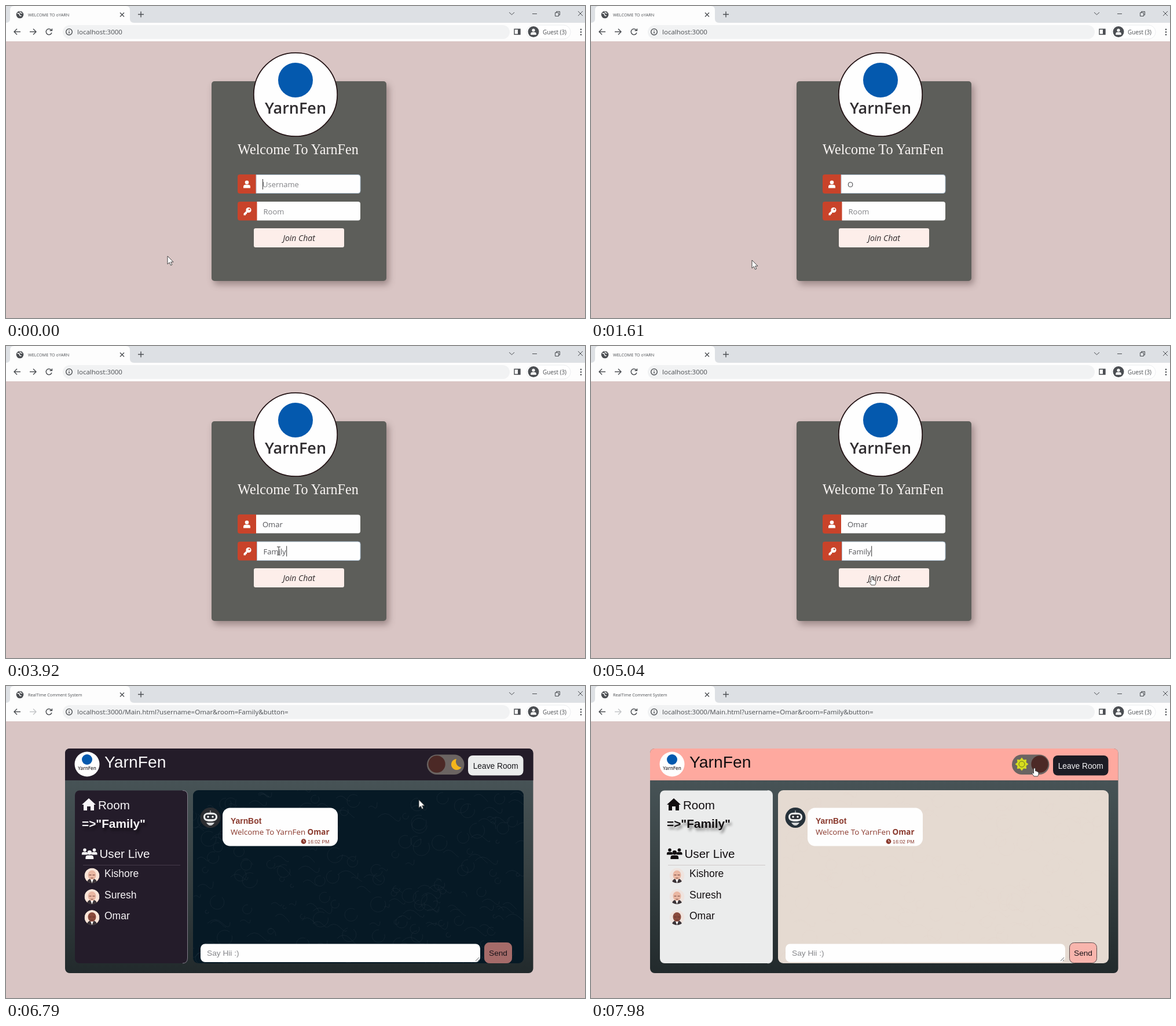
An HTML page for the animation above (8000 ms loop, 1000 by 539 pixels).

```html
<!DOCTYPE html>
<html lang="en">
<head>
<meta charset="utf-8">
<title>Chat room demo</title>
<style>
  html, body { margin: 0; width: 100%; height: 100%; overflow: hidden; background: #d9c5c4; }
  svg { display: block; width: 100%; height: 100%; }
  text { white-space: pre; }
  .ui { font-family: "Open Sans", "Noto Sans", sans-serif; }
  .arial { font-family: "Liberation Sans", sans-serif; }
  .serif { font-family: "Liberation Serif", serif; }
  .line { fill: none; stroke: #4b4e52; stroke-width: 1.4; }

  #login, #chat, #cursor, #cursor > *, .ball { animation: 8s step-end infinite; }
  #login { animation-name: login; }
  #chat { animation-name: chat, theme; }
  @keyframes login { 0% { visibility: visible; } 67.375%, 100% { visibility: hidden; } }
  @keyframes chat { 0% { visibility: hidden; } 67.375%, 100% { visibility: visible; } }
  @keyframes theme {
    0% {
      --head: #241c29; --side: #241c2a; --room: #061925; --ink: #f8f6f8; --edge: #8d8794;
      --leave: #ebecec; --leaveInk: #17171b; --send: #a56b69; --sendEdge: #a56b69;
      --doodle: #2b3b45; --avatar: #fbe5d8; --bot: #2b2d31; --rule: #453a4a;
    }
    92.75%, 100% {
      --head: #fea99f; --side: #ebecec; --room: #e5dad1; --ink: #120e10; --edge: #ebecec;
      --leave: #1c1c24; --leaveInk: #f5f5f7; --send: #f8b5ad; --sendEdge: #5b4a4c;
      --doodle: #e1d5cb; --avatar: #efe4df; --bot: #26313a; --rule: #cfcaca;
    }
  }
  .head { fill: var(--head); }
  .ink { fill: var(--ink); }
  .shadow { filter: drop-shadow(3px 5px 2px rgba(0, 0, 0, .45)); }
  .doodles { fill: none; stroke: var(--doodle); stroke-width: .7; opacity: .5; }
  .ball { animation-name: slide; animation-timing-function: linear; }
  @keyframes slide { 0%, 92.75% { transform: translateX(0); } 95.25%, 100% { transform: translateX(31px); } }

  #cursor { animation-name: travel; animation-timing-function: ease-in-out; }
  @keyframes travel {
    0%, 10% { transform: translate(279px, 432px); }
    14%, 30% { transform: translate(278px, 439px); animation-timing-function: ease-in; }
    34.125% { transform: translate(442px, 379px); animation-timing-function: ease-out; }
    36.3%, 52.5% { transform: translate(471px, 354px); }
    57.5%, 67.3% { transform: translate(485px, 399px); }
    67.4%, 77% { transform: translate(484px, 401px); }
    84.875% { transform: translate(713px, 196.5px); }
    88.5%, 100% { transform: translate(766px, 142px); }
  }
  #arrow { animation-name: arrow; }
  #beam { animation-name: beam; }
  #hand { animation-name: hand; }
  @keyframes arrow { 0% { opacity: 1; } 35.6% { opacity: 0; } 67.375% { opacity: 1; } 87.5%, 100% { opacity: 0; } }
  @keyframes beam { 0% { opacity: 0; } 35.6% { opacity: 1; } 54.7%, 100% { opacity: 0; } }
  @keyframes hand { 0% { opacity: 0; } 54.7% { opacity: 1; } 67.375% { opacity: 0; } 87.5%, 100% { opacity: 1; } }
</style>
</head>
<body>
<svg viewBox="0 0 1000 539" preserveAspectRatio="none">
  <defs>
    <linearGradient id="wall" x2="0" y2="1">
      <stop offset=".14" stop-color="#475356"/><stop offset=".5" stop-color="#394345"/><stop offset="1" stop-color="#222a2c"/>
    </linearGradient>
    <clipPath id="panel"><rect x="102" y="108" width="808.500" height="388" rx="8"/></clipPath>
    <clipPath id="roomClip"><rect x="323" y="180" width="571" height="299" rx="9"/></clipPath>
    <clipPath id="face"><circle r="13"/></clipPath>
    <g id="person" clip-path="url(#face)">
      <circle r="13" style="fill:var(--avatar)"/>
      <path d="M-9 13Q-8 5 0 5T9 13Z" fill="#3b3438"/><path d="M-3 5L0 13 3 5Z" fill="#fff"/>
      <ellipse cy="-1" rx="7" ry="8"/>
      <path d="M-5-1h4M1-1h4M-2 4Q0 5 2 4" fill="none" stroke="#5a2d2a" stroke-width=".9"/>
    </g>
    <g id="bust"><circle r="3.3" cy="-3.3"/><path d="M-6 6.5V4.5Q-6 .8-2.5 .8H2.5Q6 .8 6 4.5V6.5Z"/></g>
  </defs>

  <rect width="1000" height="539" fill="#d9c5c4"/>
  <g class="ui" fill="#4b4e52">
    <rect width="1000" height="30" fill="#dde0e4"/>
    <path d="M0 29Q7 29 7 22V7Q7 0 14 0H207Q214 0 214 7V22Q214 29 221 29H1000V61H0Z" fill="#fdfdfd"/>
    <circle cx="24" cy="15" r="6.300"/>
    <path d="M19.500 12.500q4 0 4 2.500t3 1.500M24 9.500q0 3 4 3" class="line" style="stroke:#fdfdfd"/>
    <path class="line" d="M197 11.500l7 7m0-7l-7 7M228 14.500h10m-5-5v10"/>
    <g class="line" style="stroke-width:1"><path d="M869 11l4.500 4 4.500-4M909 13.500h8M948.500 11.500h6v6h-6zM950.500 11v-1.500h6v6h-2M988 9l8 8m0-8l-8 8"/></g>
    <rect x="98" y="33" width="772" height="24" rx="12" fill="#f1f2f3"/>
    <path class="line" d="M25 44.500H14m5-5l-5 5 5 5"/>
    <path class="line" id="forward" d="M41 44.500H52m-5-5l5 5-5 5"/>
    <path class="line" d="M78.500 42A5 5 0 1 0 79 46M79.500 39v3.500h-4"/>
    <circle class="line" cx="109" cy="44.700" r="5.300"/><path class="line" d="M109 44v3.500M109 41.500v1.300"/>
    <path class="line" d="M878 40h10v9h-10z"/><path d="M884 40h4v9h-4z"/>
    <rect x="899" y="33" width="76" height="24" rx="12" fill="#fff" stroke="#eceef0"/>
    <circle cx="911" cy="44.500" r="9.500"/><use href="#bust" transform="translate(911 44.500) scale(.8)" fill="#fff"/>
    <text x="927" y="48.500" font-size="9.900">Guest (3)</text>
    <circle cx="993" cy="40.500" r="1.300"/><circle cx="993" cy="45" r="1.300"/><circle cx="993" cy="49.500" r="1.300"/>
    <text id="tab" x="38" y="17.700" font-size="7.300"></text>
    <text id="url" x="123" y="48.800" font-size="11.570"></text>
  </g>

  <g id="login" class="ui">
    <rect x="355" y="130" width="302" height="345" rx="5" fill="#5d5e5a" style="filter:drop-shadow(4px 6px 6px rgba(60,40,40,.4))"/>
    <circle cx="500" cy="153" r="72.200" fill="#fefefe" stroke="#241416" stroke-width="1.800"/>
    <circle cx="500" cy="128" r="30" fill="#0459ae"/>
    <text x="500" y="186" font-size="27" font-weight="600" text-anchor="middle" fill="#302d30">YarnFen</text>
    <text class="serif" x="400" y="256" font-size="24.200" fill="#faf6f4">Welcome To YarnFen</text>
    <path d="M404 291H432V324H404Q400 324 400 320V295Q400 291 404 291ZM404 338H434V370.500H404Q400 370.500 400 366V342Q400 338 404 338Z" fill="#c8432a"/>
    <g id="boxes" fill="#fefefe">
      <path d="M432 291.500H608Q612 291.500 612 295.500V319.500Q612 323.500 608 323.500H432Z"/>
      <path d="M433.500 338H608Q612 338 612 342V366.500Q612 370.500 608 370.500H433.500Z"/>
    </g>
    <use href="#bust" x="416" y="308" fill="#fff"/>
    <circle cx="419" cy="352.500" r="4.600" fill="#fff"/><circle cx="420.200" cy="351.300" r="1.300" fill="#c8432a"/>
    <path d="M416 353l-5.500 5.500V361.500H414V359.500H416V357.500L419 355.500Z" fill="#fff"/>
    <text id="user" x="443" y="313" font-size="13"></text>
    <text id="room" x="444.500" y="359.500" font-size="13"></text>
    <rect id="caret" width="1" height="18" fill="#333"/>
    <rect x="428" y="384" width="156" height="33" rx="3" fill="#fdeeea"/>
    <text x="506" y="406" font-size="14" font-style="italic" text-anchor="middle" fill="#2c2728">Join Chat</text>
  </g>

  <g id="chat" class="arial">
    <g clip-path="url(#panel)">
      <rect x="102" y="108" width="809" height="388" fill="url(#wall)"/>
      <rect class="head" x="102" y="108" width="809" height="55"/>
    </g>
    <circle cx="140" cy="135" r="21.500" fill="#fefefe"/><circle cx="140" cy="127" r="9" fill="#0459ae"/>
    <text class="ui" x="140" y="145" font-size="8" font-weight="600" text-anchor="middle" fill="#302d30">YarnFen</text>
    <text class="ink" x="170" y="140.700" font-size="28.300">YarnFen</text>

    <rect x="727" y="118.500" width="64.500" height="34.500" rx="17.200" fill="#6b6462"/>
    <g transform="translate(744 135)">
      <path id="sun" fill="#d6dd1f"/><circle r="5" fill="none" stroke="#6d7020"/>
    </g>
    <path d="M778 126A9.500 9.500 0 1 0 786.500 140.500A10 10 0 0 1 778 126Z" fill="#f3b51c"/>
    <circle class="ball" cx="744" cy="135" r="14.700" fill="#4c2926"/>
    <rect x="798" y="120" width="95.500" height="34.500" rx="8" style="fill:var(--leave)"/>
    <text x="845.700" y="143" font-size="13.750" text-anchor="middle" style="fill:var(--leaveInk)">Leave Room</text>

    <rect x="119" y="180.500" width="194.500" height="298.500" rx="8" style="fill:var(--side)"/>
    <path d="M305 180.500Q313.500 180.500 313.500 189V470Q313.500 479 305 479" fill="none" style="stroke:var(--edge);stroke-width:.9"/>
    <g class="ink">
      <path d="M143 194L155 205H152V215H146V208H140V215H134V205H131Z"/>
      <text x="159" y="213" font-size="20.600">Room</text>
      <text class="shadow" x="131" y="244.500" font-size="20.800" font-weight="700">=&gt;"Family"</text>
      <use href="#bust" transform="translate(136 286) scale(.85)"/>
      <use href="#bust" transform="translate(152.500 286) scale(.85)"/>
      <use href="#bust" transform="translate(144.300 290.500) scale(1.350)" style="fill:var(--side)"/>
      <use href="#bust" transform="translate(144.300 291.500) scale(1.150)"/>
      <text x="161.500" y="297" font-size="20.600">User Live</text>
      <text x="170" y="330" font-size="17.500">Kishore</text>
      <text x="170" y="366.500" font-size="17.500">Suresh</text>
      <text x="170" y="402.500" font-size="17.500">Omar</text>
    </g>
    <path d="M133 309.500H301" style="stroke:var(--rule)"/>
    <use href="#person" x="148.500" y="327.500" fill="#eab7a2"/>
    <use href="#person" x="148.500" y="364" fill="#eab7a2"/>
    <use href="#person" x="148.500" y="400" fill="#8a4a3c"/>

    <rect x="323" y="180" width="571" height="299" rx="9" style="fill:var(--room)"/>
    <g clip-path="url(#roomClip)"><path id="doodles" class="doodles"/></g>
    <circle cx="353" cy="227.500" r="17.500" style="fill:var(--bot)"/>
    <path d="M353 219V215" stroke="#ddd"/>
    <path d="M341 226Q341 218.500 353 218.500T365 226Q365 234 353 234T341 226Z" fill="#eceded"/>
    <rect x="344" y="222" width="18" height="8" rx="4" fill="#2d3036"/>
    <circle cx="349" cy="226" r="1.700" fill="#fff"/><circle cx="357" cy="226" r="1.700" fill="#fff"/>
    <path d="M346 236H360Q357 241 353 241T346 236Z" fill="#d3d5d6"/>
    <rect x="374" y="210.500" width="199" height="66" rx="13" fill="#fefefe"/>
    <g fill="#8a392d">
      <text x="388" y="238" font-size="13.900" font-weight="700">YarnBot</text>
      <text class="ui" x="388" y="256.500" font-size="13.350">Welcome To YarnFen <tspan font-weight="700">Omar</tspan></text>
      <circle cx="514" cy="268.500" r="4.400"/><path d="M514 265.500v3l2 1" fill="none" stroke="#fff" stroke-width=".9"/>
      <text x="521" y="271.700" font-size="8.800">16:02 PM</text>
    </g>
    <rect x="336" y="445.500" width="483" height="31.500" rx="8" fill="#fefefe"/>
    <path d="M811 475l6-6M815 475l2-2" class="line" style="stroke-width:.9"/>
    <text x="347" y="465.500" font-size="13.700" fill="#85868a">Say Hii :)</text>
    <rect x="826.500" y="443.500" width="47" height="35" rx="8" style="fill:var(--send);stroke:var(--sendEdge)"/>
    <text x="850" y="465.500" font-size="13.700" text-anchor="middle" fill="#191318">Send</text>
  </g>

  <g id="cursor" fill="#fff" stroke="#333" stroke-width=".9">
    <path id="arrow" d="M0 0V14L3.300 11 5.500 16 7.800 15 5.600 10.200H10Z"/>
    <path id="beam" d="M-3-7H3M0-7V7M-3 7H3" stroke="#222"/>
    <path id="hand" d="M-1 0Q1-1 1.500 1V5Q3 4 3.500 5.500 5 5 5.500 6.500 7 6 7 8V10Q7 12 5.500 14H-1Q-4 10-4.500 8-3.500 6.500-1.500 9V1Z"/>
  </g>
</svg>
<script>
  const LOOP = 8000, PAGE_SWITCH = 5390, ROOM_CLICK = 2950, BLINK = 530;
  const $ = id => document.getElementById(id);

  const fields = [
    { el: $('user'), hint: 'Username', value: 'Omar', keys: [1050, 1750, 1960, 2240] },
    { el: $('room'), hint: 'Room', value: 'Family', keys: [3150, 3300, 3430, 3640, 3780, 3920] }
  ];
  const boxes = $('boxes').children;

  // Eight-pointed sun
  $('sun').setAttribute('d', 'M' + Array.from({ length: 16 }, (_, i) => {
    const r = i % 2 ? 8.2 : 11.5, a = i * Math.PI / 8;
    return `${(r * Math.cos(a)).toFixed(1)} ${(r * Math.sin(a)).toFixed(1)}`;
  }).join('L') + 'Z');

  // Faint wallpaper of loops and squiggles
  let seed = 7;
  const rand = (lo, hi) => {
    seed = seed * 16807 % 2147483647;
    return Math.round(lo + (hi - lo) * seed / 2147483647);
  };
  let doodles = '';
  for (let i = 0; i < 220; i++) {
    const r = rand(3, 14);
    doodles += `M${rand(323, 894)} ${rand(180, 479)}`;
    doodles += i % 2 ? `q${r} ${-r} ${2 * r} 0t${r} ${rand(-9, 12)}` : `a${r} ${r} 0 1 0 ${rand(3, r)} ${rand(2, r)}`;
  }
  $('doodles').setAttribute('d', doodles);

  function drawField({ el, hint, value, keys }, t) {
    const typed = value.slice(0, keys.filter(k => k <= t).length);
    const shown = typed || hint;
    if (el.textContent !== shown) el.textContent = shown;
    el.setAttribute('fill', typed ? '#55565a' : '#818286');
    return typed ? el.getComputedTextLength() + 0.5 : 0;
  }

  function draw(now) {
    const t = now % LOOP, inRoom = t >= PAGE_SWITCH;
    const focus = t < ROOM_CLICK ? 0 : 1;
    const active = fields[focus];
    const widths = fields.map(f => drawField(f, t));
    const since = Math.max(focus ? ROOM_CLICK : 0, ...active.keys.filter(k => k <= t));

    $('caret').setAttribute('x', +active.el.getAttribute('x') + widths[focus]);
    $('caret').setAttribute('y', +active.el.getAttribute('y') - 14);
    $('caret').style.opacity = Math.floor((t - since) / BLINK) % 2 ? 0 : 1;
    fields.forEach((_, i) => boxes[i].setAttribute('stroke', i === focus ? '#a9bccd' : 'none'));

    $('tab').textContent = inRoom ? 'RealTime Comment System' : 'WELCOME TO oYARN';
    $('url').textContent = 'localhost:3000' + (inRoom ? '/Main.html?username=Omar&room=Family&button=' : '');
    $('forward').style.stroke = inRoom ? '#c3c5c8' : '';
    requestAnimationFrame(() => draw(performance.now()));
  }
  draw(performance.now());
</script>
</body>
</html>
```
